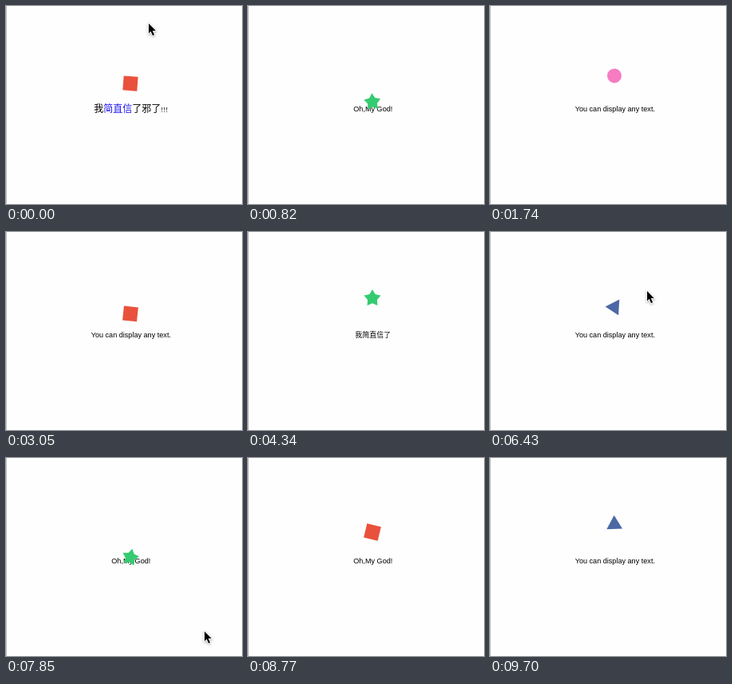
An HTML page with a canvas that plays this animation: 296x248 px, repeating every 9730 ms.

```html
<!DOCTYPE html>
<html lang="en">
<head>
<meta charset="utf-8">
<title>Bouncing shape loader</title>
<style>
  html, body { margin: 0; width: 100%; height: 100%; overflow: hidden; background: #fefefe; }
  canvas { display: block; }
</style>
</head>
<body>
<canvas id="stage" width="296" height="248"></canvas>
<script>
const ctx = document.getElementById('stage').getContext('2d');
const LOOP = 9730;
const CENTER_X = 156, APEX_Y = 83, DROP = 46;

// [time, bounce count]; whole counts are apexes, halves are landings
const BEATS = [[0, 0.355], [1150, 2], [1945, 3], [5125, 7], [7475, 10], [8250, 11], [9785, 13]];
// [time, x, y] of the pointer tip
const POINTER_OUT = [[0, 179, 22], [100, 179, 20], [700, 183, -24]];
const POINTER_IN = [[5700, 186, -24], [6430, 197, 74], [7150, 253, 150], [7850, 249, 217], [8130, 252, 252]];

const LATIN = '9.1px "Liberation Sans", Arial, sans-serif';
const HAN = '"Noto Sans CJK SC", "Noto Sans CJK", sans-serif';
const ANY = { y: 132, runs: [['You can display any text.', LATIN]] };
const OMG = { y: 132, runs: [['Oh,My God!', LATIN]] };
const SHORT = { y: 132, runs: [['我简直信了', '9px ' + HAN]] };
const BLANK = { y: 132, runs: [] };
const RICH = {
  y: 133,
  runs: [
    ['我', '12px ' + HAN],
    ['简直信', '12px ' + HAN, '#1a12f0'],
    ['了邪了', '12px ' + HAN],
    ['!!!', '9px "Liberation Serif", serif']
  ]
};
const CAPTIONS = [RICH, OMG, OMG, ANY, ANY, SHORT, SHORT, BLANK, ANY, ANY, OMG, SHORT, OMG, ANY];

const SHAPES = [
  { color: '#e9513c', points: polygon(4, 12.73, 45) },
  { color: '#4c68a5', points: polygon(3, 11.4) },
  { color: '#35cb70', points: polygon(10, 11, 0, 6.2) },
  { color: '#f77cc2' }
];

function polygon(count, radius, turn = 0, inner = radius) {
  return Array.from({ length: count }, (_, i) => {
    const angle = (turn - 90 + i * 360 / count) * Math.PI / 180;
    const r = i % 2 ? inner : radius;
    return [r * Math.cos(angle), r * Math.sin(angle)];
  });
}

function track(keys, t) {
  let i = 1;
  while (i < keys.length - 1 && t > keys[i][0]) i++;
  const a = keys[i - 1], b = keys[i];
  const k = (t - a[0]) / (b[0] - a[0]);
  return a.slice(1).map((v, n) => v + (b[n + 1] - v) * k);
}

function tracePoints(points) {
  ctx.beginPath();
  points.forEach(([x, y]) => ctx.lineTo(x, y));
  ctx.closePath();
}

function drawShape(bounce, count) {
  const shape = SHAPES[count % SHAPES.length];
  const offset = (bounce - count) * 2;
  const depth = Math.pow(Math.abs(offset), 3.5);
  const angle = depth * (offset < 0 ? -360 : 14);
  ctx.save();
  ctx.translate(CENTER_X, APEX_Y + DROP * depth);
  ctx.rotate(angle * Math.PI / 180);
  if (shape.points) {
    tracePoints(shape.points);
  } else {
    ctx.beginPath();
    ctx.arc(0, 0, 9, 0, Math.PI * 2);
  }
  ctx.fillStyle = shape.color;
  ctx.fill();
  ctx.restore();
}

function drawCaption({ y, runs }) {
  const widths = runs.map(([text, font]) => {
    ctx.font = font;
    return ctx.measureText(text).width;
  });
  let x = CENTER_X + 0.8 - widths.reduce((sum, w) => sum + w, 0) / 2;
  runs.forEach(([text, font, color = '#000'], i) => {
    ctx.font = font;
    ctx.fillStyle = color;
    ctx.fillText(text, x, y);
    x += widths[i];
  });
}

function drawPointer(keys, t) {
  if (t < keys[0][0] || t > keys[keys.length - 1][0]) return;
  const [x, y] = track(keys, t);
  ctx.save();
  ctx.translate(x, y);
  ctx.scale(0.88, 0.88);
  tracePoints([[0, 0], [0, 14], [3, 11], [5.6, 17], [8, 16], [5.4, 10.2], [10, 10]]);
  ctx.shadowColor = 'rgba(0,0,0,.35)';
  ctx.shadowBlur = 3;
  ctx.shadowOffsetY = 1;
  ctx.lineWidth = 2;
  ctx.strokeStyle = '#fff';
  ctx.stroke();
  ctx.shadowColor = 'transparent';
  ctx.fillStyle = '#000';
  ctx.fill();
  ctx.restore();
}

function draw(t) {
  ctx.fillStyle = '#fefefe';
  ctx.fillRect(0, 0, 296, 248);
  ctx.fillStyle = '#c4c4c4';
  ctx.fillRect(0, 0, 1, 248);

  const [bounce] = track(BEATS, t);
  const count = Math.round(bounce);
  drawCaption(CAPTIONS[count]);
  drawShape(bounce, count);
  drawPointer(POINTER_OUT, t);
  drawPointer(POINTER_IN, t);
}

const start = performance.now();
function frame() {
  draw((performance.now() - start) % LOOP);
  requestAnimationFrame(frame);
}
frame();
</script>
</body>
</html>
```
